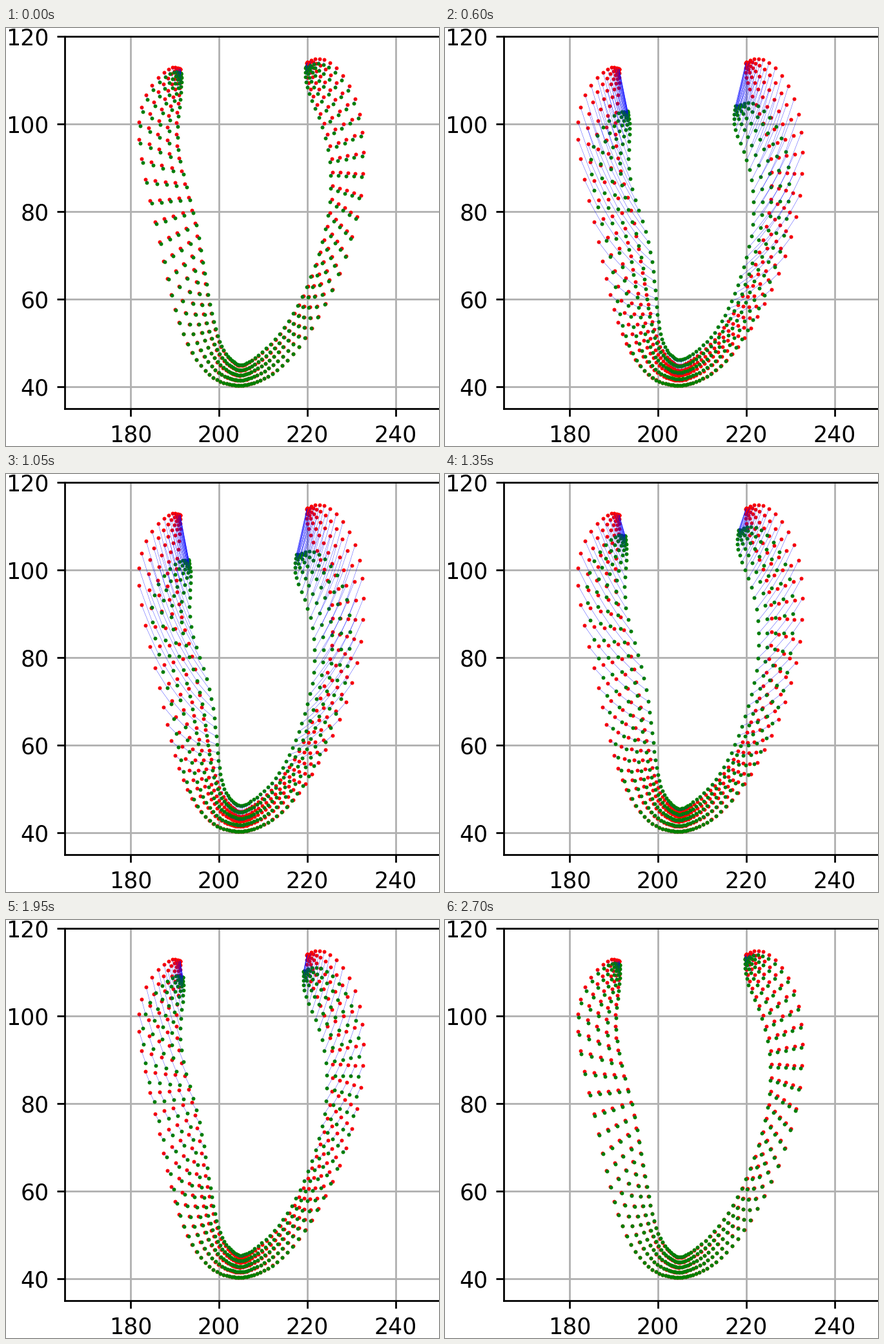
Recreate the animation shown at these times as a matplotlib script. Size 671 px wide and 649 px high, loop 2850 ms.

```python
import numpy as np
import matplotlib.pyplot as plt
from matplotlib.animation import FuncAnimation
from matplotlib.collections import LineCollection

W, H, DPI = 671, 649, 250
LEFT, BOTTOM, X_SCALE, Y_SCALE = 90.6, 591, 6.84, 6.8
APEX, LAYERS = 40, 5
FRAMES, INTERVAL = 19, 150

plt.rcParams["font.family"] = "DejaVu Sans"


def spline(knots, values, at):
    """Natural cubic spline through values at the given knots."""
    def basis(t):
        return np.abs(t[:, None] - knots) ** 3

    line = np.column_stack([np.ones(len(knots)), knots])
    system = np.block([[basis(knots), line], [line.T, np.zeros((2, 2))]])
    weights = np.linalg.solve(system, np.vstack([values, np.zeros((2, 2))]))
    return np.column_stack([basis(at), np.ones(len(at)), at]) @ weights


def fall(t, middle, width):
    """Smooth step from 1 down to 0."""
    return 1 / (1 + np.exp((t - middle) / width))


def layered(outer, inner):
    depth = np.linspace(0, 1, LAYERS)[:, None, None]
    return (outer + (inner - outer) * depth).reshape(-1, 2)


def to_data(p):
    return np.column_stack([165 + (p[:, 0] - LEFT) / X_SCALE,
                            35 + (BOTTOM - p[:, 1]) / Y_SCALE])


column = np.arange(2 * APEX + 1.0)
side = np.sign(column - APEX)
from_tip = APEX - np.abs(column - APEX)

# Resting wall in pixels, from the left tip through the apex to the right tip.
half = np.array([0, 5, 10, 15, 20, 28, 34])
knots = np.concatenate([half, [APEX], 2 * APEX - half[::-1]]).astype(float)
outer = spline(knots, [
    (269, 63), (245, 69), (206, 146), (231, 301), (262, 437), (315, 538),
    (346, 553), (364, 555), (384, 550.5),
    (420, 531), (495, 428), (544, 293), (548, 134), (502, 54), (467, 53)], column)
inner = spline(knots, [
    (270, 64), (268, 104), (265, 183), (288, 283), (306, 380), (330, 487),
    (350, 517), (364.5, 524), (386, 513),
    (425, 475), (481, 367), (505, 266), (498, 165), (472, 95), (466, 55)], column)
rest = layered(outer, inner)

# Full contraction: tips travel down and inward, the inner apex rises a little.
outer_shift = np.column_stack([
    -side * (14 + 0.75 * from_tip) * fall(from_tip, 18, 2.5),
    68 * fall(from_tip, 14.2, 2.6)])
inner_shift = np.column_stack([
    -side * (1 + 0.1 * side) * (15 + 1.1 * from_tip) * fall(from_tip, 21, 4),
    75 * fall(from_tip, 16.7 + 0.8 * side, 4.5) - 9])
shift = layered(outer_shift, inner_shift)


def contraction(n):
    """Quick squeeze, fast release to a plateau, then a slow return."""
    rise = 1 - fall(n, 2, 0.9)
    plateau = fall(n, 16.7, 1.1)
    inward = 0.80 * fall(n, 9.0, 1.1) + 0.3 * plateau
    down = 0.73 * fall(n, 8.2, 0.45) + 0.4 * plateau
    return rise * np.array([inward, down])


fig = plt.figure(figsize=(W / DPI, H / DPI), dpi=DPI, facecolor="white")
ax = fig.add_axes([LEFT / W, (H - BOTTOM) / H, 90 * X_SCALE / W, 85 * Y_SCALE / H])
ax.set(xlim=(165, 255), ylim=(35, 120),
       xticks=range(180, 241, 20), yticks=range(40, 121, 20))
ax.grid(True)

dot = dict(ls="", marker="o", ms=1.7, mew=0)
start = to_data(rest)
ax.plot(*start.T, color="red", **dot)
moving, = ax.plot([], [], color="green", **dot)
trails = ax.add_collection(LineCollection([], colors="blue", linewidths=0.1, zorder=2))


def update(n):
    now = to_data(rest + shift * contraction(n))
    moving.set_data(*now.T)
    trails.set_segments(np.stack([start, now], axis=1))
    return moving, trails


anim = FuncAnimation(fig, update, frames=FRAMES, interval=INTERVAL,
                     repeat=True, repeat_delay=0)
plt.show()
```
